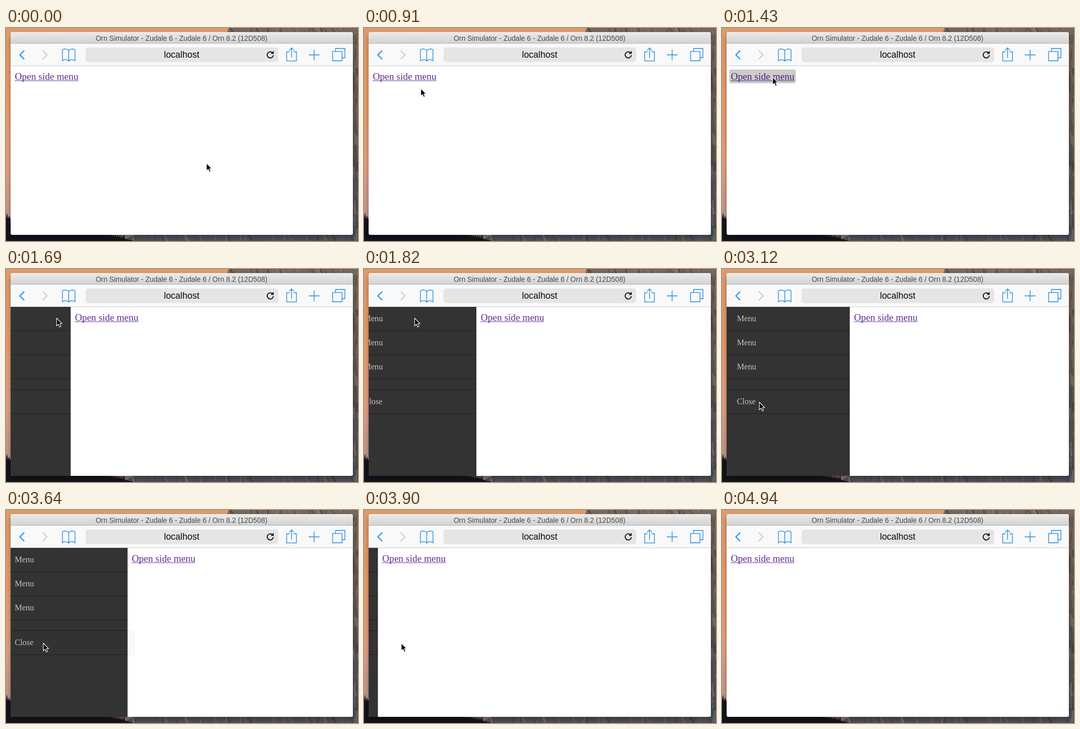
These frames come from a looping animation (686 by 416 pixels, 5070 ms). An HTML page:

```html
<!DOCTYPE html>
<html lang="en">
<head>
<meta charset="utf-8">
<title>Side menu</title>
<style>
  html, body { margin: 0; width: 100%; height: 100%; overflow: hidden; background: #222; }
  svg { display: block; width: 686px; height: 416px; }
  .sans { font-family: "Liberation Sans", Arial, sans-serif; text-anchor: middle; }
  .serif { font-family: "Liberation Serif", Times, serif; }
  .icon { fill: none; stroke: #1d86e0; stroke-width: 1.3; }
</style>
</head>
<body>
<svg viewBox="0 0 686 416">
  <defs>
    <linearGradient id="sky" x1="0" y1="0" x2="0" y2="1">
      <stop offset="0" stop-color="#dd9a6c"/>
      <stop offset=".35" stop-color="#e69a6b"/>
      <stop offset=".65" stop-color="#dfa083"/>
      <stop offset=".86" stop-color="#c5958a"/>
      <stop offset="1" stop-color="#8b6f6c"/>
    </linearGradient>
    <linearGradient id="rock" x1="0" y1="0" x2="0" y2="1">
      <stop offset="0" stop-color="#75675b"/>
      <stop offset=".5" stop-color="#5c544f"/>
      <stop offset="1" stop-color="#4b5058"/>
    </linearGradient>
    <linearGradient id="titlebar" x1="0" y1="0" x2="0" y2="1">
      <stop offset="0" stop-color="#ebebeb"/>
      <stop offset="1" stop-color="#d2d2d2"/>
    </linearGradient>
    <filter id="blur" x="-10%" y="-10%" width="120%" height="120%">
      <feGaussianBlur stdDeviation="5"/>
    </filter>
    <clipPath id="frame"><rect x="9" y="8" width="667" height="396" rx="4"/></clipPath>
    <clipPath id="view"><path d="M9 74H676V400a4 4 0 0 1-4 4H13a4 4 0 0 1-4-4Z"/></clipPath>
  </defs>

  <g id="desktop">
    <rect width="686" height="416" fill="url(#sky)"/>
    <path d="M434 0H686V416H225L300 380Z" fill="url(#rock)"/>
    <g id="cracks" fill="none"></g>
    <path id="trees" fill="#11151b"/>
  </g>
  <rect x="9" y="14" width="667" height="394" rx="5" opacity=".32" filter="url(#blur)"/>

  <g clip-path="url(#frame)">
    <rect x="9" y="8" width="667" height="396" fill="#fff"/>
    <rect x="9" y="8" width="667" height="22" fill="url(#titlebar)"/>
    <rect x="9" y="8" width="667" height="1" fill="#f5f5f5"/>
    <rect x="9" y="30" width="667" height="44" fill="#f9f9f9"/>
    <rect x="9" y="29.5" width="667" height="1" fill="#b4b4b4"/>
    <rect x="9" y="73.5" width="667" height="1" fill="#b9b9b9"/>
  </g>
  <text class="sans" x="342" y="24.5" font-size="13.75" fill="#4a4a4a">Orn Simulator - Zudale 6 - Zudale 6 / Orn 8.2 (12D508)</text>
  <rect x="155" y="38" width="375.5" height="28.5" rx="5" fill="#e5e5e6"/>
  <text class="sans" x="342.3" y="58" font-size="17.5" fill="#0a0a0a">localhost</text>

  <g class="icon">
    <path d="M35.5 44L27 52.5 35.5 61" stroke-width="1.9"/>
    <path d="M71.5 44L80 52.5 71.5 61" stroke="#c9c9c9" stroke-width="1.9"/>
    <path d="M122.3 44C119.5 40.5 113.5 40.2 110 42.5V64C113.5 61 119.5 61 122.3 64.5C125 61 131 61 134.5 64V42.5C131 40.2 125 40.5 122.3 44V64.5"/>
    <path d="M552.5 46.5H547V64.3H566V46.5H560.5M556.5 58V39M551.7 43.6L556.5 38.8 561.3 43.6"/>
    <path d="M590 52.5H611M600.5 42V63"/>
    <path d="M636.5 45.8H654.8V64H636.5ZM642.3 45.8V40H660.5V58H654.8"/>
  </g>
  <path d="M519 48A6 6 0 1 0 521 53" fill="none" stroke="#111" stroke-width="1.9"/>
  <path d="M521.7 44.5V50.6H515.6Z" fill="#111"/>

  <g clip-path="url(#view)">
    <g id="menu">
      <rect x="-231" y="74" width="480" height="330" fill="#333"/>
      <g id="rows" class="serif" font-size="16.1" fill="#c4c4c4"></g>
    </g>
    <g id="page">
      <rect x="9" y="74.5" width="667" height="330" fill="#fff"/>
      <text class="serif" x="17.3" y="101" font-size="19.05" fill="#5f2b92">Open side menu</text>
      <rect x="17" y="102.4" width="124" height="1" fill="#5f2b92"/>
    </g>
    <rect id="linkTap" x="14" y="81" width="130" height="27" rx="4"/>
    <rect id="closeTap" x="7" y="234" width="244" height="50" rx="4"/>
  </g>
  <path id="cursor" d="M.7 0V15L4.1 11.8 6.5 17.2 9 16.1 6.7 10.8H11.2Z"
        stroke="#fff" stroke-width="1.1" stroke-linejoin="round"/>
</svg>
<script>
const LOOP = 5070, STEP = 130;
const OPEN_AT = 1565, CLOSE_AT = 3611, SLIDE = 435, MENU_WIDTH = 240;
const $ = id => document.getElementById(id);

function add(parent, tag, attrs, text = '') {
  const node = document.createElementNS('http://www.w3.org/2000/svg', tag);
  for (const key in attrs) node.setAttribute(key, attrs[key]);
  node.textContent = text;
  parent.append(node);
}

function drawDesktop() {
  let seed = 7;
  const random = () => (seed = seed * 16807 % 2147483647) / 2147483647;
  const crack = (x, y, dx, dy) => add($('cracks'), 'path', {
    d: `M${x} ${y}l${dx} ${dy}`,
    stroke: random() < .5 ? '#2b2828' : '#94877b',
    'stroke-width': 1 + random() * 3,
    opacity: .2 + random() * .25
  });
  for (let i = 0; i < 32; i++) crack(436 + random() * 248, -2, random() * 14 - 4, 12);
  for (let i = 0; i < 40; i++) crack(676 + random() * 9, random() * 410, random() * 5 - 2, 12 + random() * 18);
  for (let i = 0; i < 42; i++) crack(235 + random() * 445, 402, random() * 14 - 4, 16);

  let outline = 'M0 416V372';
  for (let x = 0; x < 232; x += 4) {
    const top = 366 + x * .17;
    outline += `L${x + 2} ${top - random() * 7}L${x + 4} ${top + 7}`;
  }
  $('trees').setAttribute('d', outline + 'L250 416Z');
}

function drawMenu() {
  for (const y of [120, 167, 214, 235, 282])
    add($('rows'), 'rect', { x: -231, y, width: 480, height: 1, fill: '#202020' });
  [['Menu', 102], ['Menu', 149], ['Menu', 196], ['Close', 263.5]]
    .forEach(([label, y]) => add($('rows'), 'text', { x: 29, y }, label));
}

const clamp = v => Math.min(1, Math.max(0, v));

// CSS "ease": cubic-bezier(.25, .1, .25, 1)
function ease(p) {
  p = clamp(p);
  const curve = (s, a, b) => 3 * a * s * (1 - s) ** 2 + 3 * b * s * s * (1 - s) + s ** 3;
  let low = 0, high = 1;
  for (let i = 0; i < 24; i++) {
    const mid = (low + high) / 2;
    if (curve(mid, .25, .25) < p) low = mid; else high = mid;
  }
  return curve(low, .1, 1);
}

// time, x, y
const cursorPath = [
  [130, 390, 264], [910, 110, 118], [1170, 98, 96], [2210, 98, 96], [2470, 95, 129],
  [3120, 72, 260], [4160, 72, 260], [4550, 130, 142], [4940, 200, -25]
];

function cursorAt(t) {
  const next = cursorPath.findIndex(point => point[0] > t);
  if (next === 0) return cursorPath[0].slice(1);
  if (next < 0) return cursorPath.at(-1).slice(1);
  const [t0, x0, y0] = cursorPath[next - 1], [t1, x1, y1] = cursorPath[next];
  const p = (t - t0) / (t1 - t0), k = p * p * (3 - 2 * p);
  return [x0 + (x1 - x0) * k, y0 + (y1 - y0) * k];
}

const tapOpacity = (t, start) =>
  t < start - 140 ? 0 : .2 * clamp((start + 40 - t) / 100);

function render(t) {
  const offset = MENU_WIDTH * (ease((t - OPEN_AT) / SLIDE) - ease((t - CLOSE_AT) / SLIDE));
  const move = (id, x, y = 0) => $(id).setAttribute('transform', `translate(${x} ${y})`);
  move('page', offset);
  move('menu', offset - MENU_WIDTH);
  move('cursor', ...cursorAt(t));
  $('linkTap').setAttribute('opacity', tapOpacity(t, OPEN_AT));
  $('closeTap').setAttribute('opacity', tapOpacity(t, CLOSE_AT));
}

drawDesktop();
drawMenu();
const begin = performance.now();
function tick() {
  const t = (performance.now() - begin) % LOOP;
  render(Math.floor(t / STEP) * STEP);
  requestAnimationFrame(tick);
}
tick();
</script>
</body>
</html>
```
